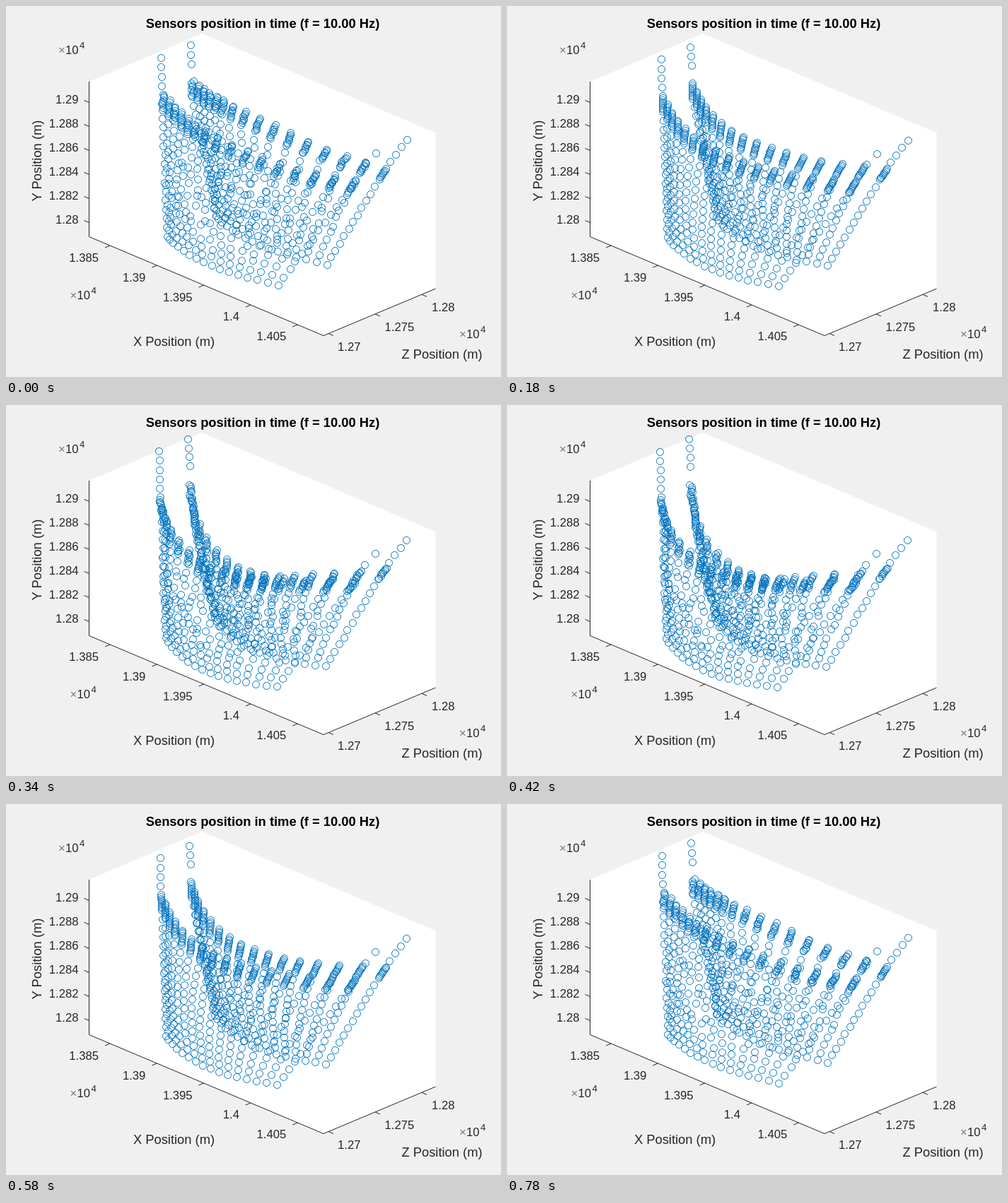
Animation of 700 by 525 pixels, one loop 0.8 s. Source, as an HTML page with a canvas:

```html
<!DOCTYPE html>
<html lang="en">
<head>
<meta charset="utf-8">
<title>Sensors position in time</title>
<style>
  html, body { margin: 0; width: 100%; height: 100%; overflow: hidden; background: #f0f0f0; }
  svg, canvas { position: absolute; left: 0; top: 0; width: 700px; height: 525px; }
  text { font: 16.67px "Liberation Sans", Arial, sans-serif; fill: #262626; }
  .label { font-size: 18.33px; text-anchor: middle; }
  .title { font-weight: bold; fill: #000; }
  .times { fill: #777; }
  .power { font-size: 13.3px; }
  .axis { fill: none; stroke: #262626; stroke-width: 1; }
</style>
</head>
<body>
<svg id="plot" viewBox="0 0 700 525">
  <path d="M117.5 107L277 39L607.5 179.5V400L449 466.5L117.5 326.5Z" fill="#fff"/>
  <path class="axis" d="M117.5 107V326.5L449 466.5L607.5 400"/>
  <text class="label title" x="363" y="31">Sensors position in time (f = 10.00 Hz)</text>
  <text class="label" x="237.5" y="481">X Position (m)</text>
  <text class="label" x="616.5" y="499">Z Position (m)</text>
  <text class="label" transform="translate(50 219) rotate(-90)">Y Position (m)</text>
</svg>
<canvas id="rings" width="700" height="525"></canvas>
<script>
const LOOP = 800, STEP = 20, COLS = 16, SAG = 0.946;
const plot = document.getElementById('plot');
const canvas = document.getElementById('rings');
const ctx = canvas.getContext('2d');
const ratio = window.devicePixelRatio || 1;
canvas.width = 700 * ratio;
canvas.height = 525 * ratio;
ctx.scale(ratio, ratio);
ctx.strokeStyle = '#0072bd';

function add(tag, attrs, content = '') {
  const el = document.createElementNS('http://www.w3.org/2000/svg', tag);
  for (const name in attrs) el.setAttribute(name, attrs[name]);
  el.textContent = content;
  plot.append(el);
}

function tick(x, y, dx, dy, value, tx, ty, anchor) {
  add('path', { class: 'axis', d: `M${x} ${y}l${dx} ${dy}` });
  add('text', { x: tx, y: ty, 'text-anchor': anchor }, String(+value.toFixed(3)));
}

function exponent(x, y) {
  add('text', { x, y, class: 'times' }, '×');
  add('text', { x: x + 10, y }, '10');
  add('text', { x: x + 30, y: y - 8, class: 'power' }, '4');
}

for (let i = 0; i < 6; i++)
  tick(117.5, 136.5 + 34 * i, -7, -3, 1.29 - 0.002 * i, 102.5, 138 + 34 * i, 'end');
for (let i = 0; i < 5; i++)
  tick(147 + 66.3 * i, 339 + 28 * i, -7, 3, 1.385 + 0.005 * i, 131 + 66.3 * i, 362 + 27.8 * i, 'end');
for (let i = 0; i < 3; i++)
  tick(456 + 66 * i, 463.5 - 27.6 * i, 7, 3, 1.27 + 0.005 * i, 469 + 66.5 * i, 488 - 28 * i, 'start');
exponent(74, 68);
exponent(90.5, 415);
exponent(641, 470);

// Key points of the front edge: raised and sagging
const raised = [[222, 136], [248, 162], [280, 187], [338, 214], [408, 240], [489, 256]];
const sagging = [[219, 142], [233, 186], [273, 228], [324, 248], [389, 255], [488, 257]];

const mix = (a, b, k) => a + (b - a) * k;

// Catmull-Rom curve through the key points, u from 0 to 1
function spline(keys, u, axis) {
  const last = keys.length - 1;
  const i = Math.min(Math.floor(u * last), last - 1), s = u * last - i;
  const b = keys[i][axis], c = keys[i + 1][axis];
  const a = i > 0 ? keys[i - 1][axis] : 2 * b - c;
  const d = i + 2 <= last ? keys[i + 2][axis] : 2 * c - b;
  return b + s / 2 * (c - a + s * (2 * a - 5 * b + 4 * c - d + s * (3 * (b - c) + d - a)));
}

// Repeatable random number from -1 to 1
function noise(i, j, seed) {
  const v = Math.sin(i * 127.1 + j * 311.7 + seed * 74.7) * 43758.5453;
  return 2 * (v - Math.floor(v)) - 1;
}

// Markers sit on whole pixels
function ring(x, y) {
  ctx.beginPath();
  ctx.arc(Math.floor(x) + 0.5, Math.floor(y) + 0.5, 5, 0, 2 * Math.PI);
  ctx.stroke();
}

function column(wall, i, k, swing) {
  const u = i / (COLS - 1), bulge = Math.sin(Math.PI * u), along = u ** 1.45;
  const tx = mix(spline(raised, u, 0), spline(sagging, u, 0), k) + wall * (42 + 2 * u - 4 * bulge);
  const ty = mix(spline(raised, u, 1), spline(sagging, u, 1), k) + wall * (mix(-19, 20, k) * bulge - 18);
  const bx = 228 + 157 * along + wall * 69 - 2 * k;
  const by = 326 + 69 * along + 14 * bulge - wall * 29 + k * (4 + 8 * bulge);
  const wobble = (j, seed) => swing * noise(i, j, seed + 2 * wall);

  // Dense band at the edge
  const half = 11 - 3.5 * u;
  const slope = 0.05 + 0.65 * u ** 1.5 - 0.15 * k * (1 - u);
  for (let j = -4; j <= 4; j++) {
    const d = half * j / 4;
    ring(tx + d * slope + 1.5 * wobble(j, 1), ty - d + wobble(j, 2));
  }

  // Sparse strand down to the base
  const ax = tx - half * slope, ay = ty + half;
  const cx = (ax + bx) / 2 - 18 * bulge, cy = (ay + by) / 2;
  const n = Math.round(14 - 2 * u);
  for (let j = 1; j <= n; j++) {
    const s = j / n, r = 1 - s;
    const loose = Math.sin(Math.PI * s) * (1.5 + 4 * bulge);
    ring(r * r * ax + 2 * r * s * cx + s * s * bx + loose * wobble(j + 9, 1),
         r * r * ay + 2 * r * s * cy + s * s * by + loose * wobble(j + 9, 2));
  }
}

function tail(x, y, dx, dy, from, to) {
  for (let j = from; j < to; j++) ring(x + dx * j, y + dy * j);
}

function draw() {
  const t = Math.floor(performance.now() % LOOP / STEP) * STEP;
  const swing = Math.cos(2 * Math.PI * t / LOOP);
  const p = (1 - swing) / 2, k = p / SAG;
  ctx.clearRect(0, 0, 700, 525);
  for (const wall of [0, 1])
    for (let i = 0; i < COLS; i++) column(wall, i, k, swing);

  // The topmost markers enter the axes only near full sag
  const from = p > 0.9 ? -1 : 0;
  tail(219.6 - 2.6 * k, 73.5 + 5.5 * k, 0.2, 13.4 - 0.3 * k, from, 4);
  tail(261 - 2.5 * k, 55.8 + 5.3 * k, 0.8, 13.3 - 0.4 * k, from, 3);
  tail(523.8 - 1.7 * k, 208 + 2.7 * k, -14.2, 15.5, 0, 2);
  tail(567.9 - 1.7 * k, 189 + 2.7 * k, -8.2, 10.5, 0, 4);
  requestAnimationFrame(draw);
}
draw();
</script>
</body>
</html>
```
